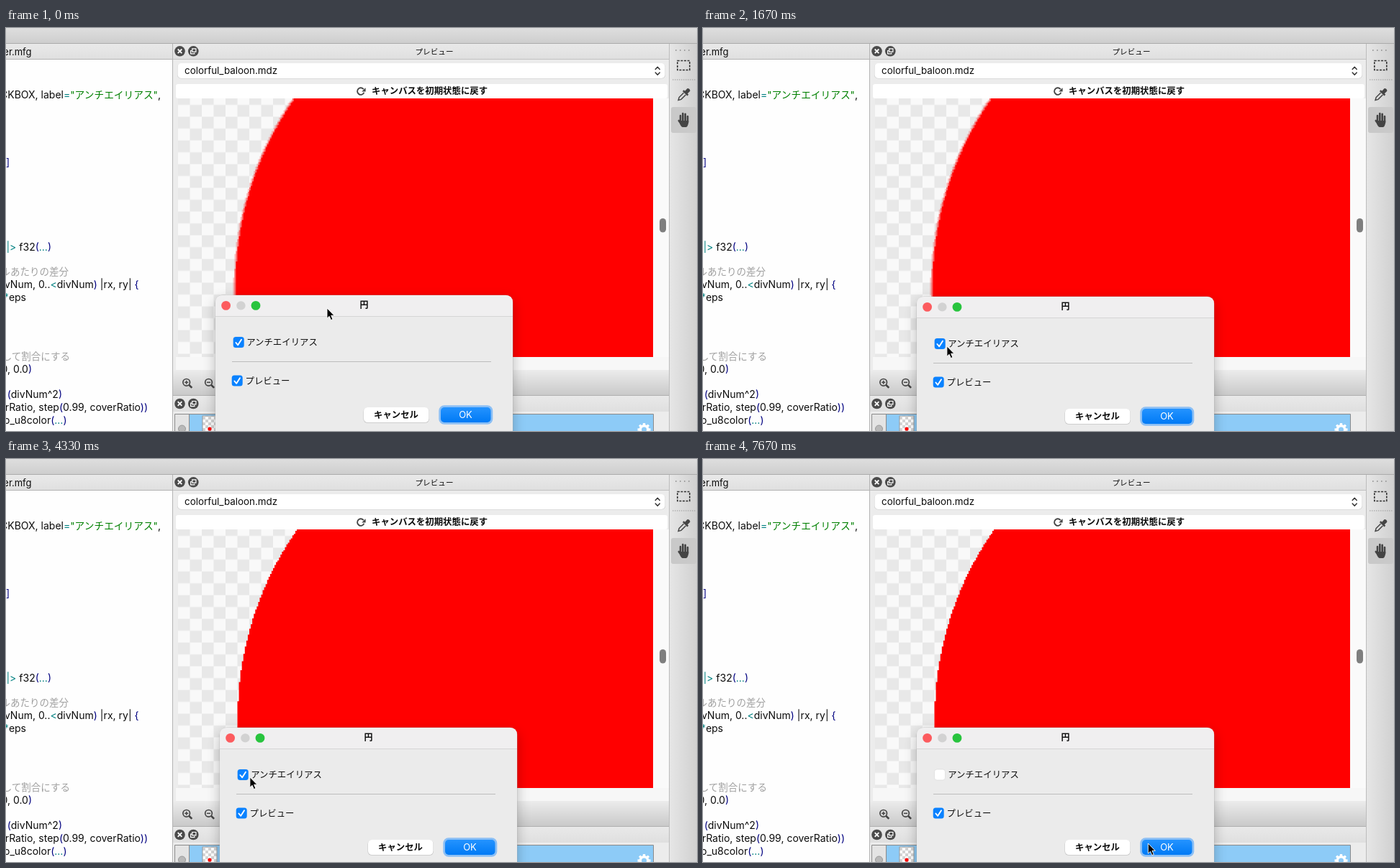
An HTML page for the animation above (8 s loop, 960x561 px).

```html
<!DOCTYPE html>
<html lang="ja">
<head>
<meta charset="utf-8">
<title>プレビュー</title>
<style>
html, body { margin: 0; width: 100%; height: 100%; overflow: hidden; background: #ececec; }
svg { display: block; width: 100vw; height: 100vh; }
text { font-family: Inter, "Noto Sans CJK JP", sans-serif; fill: #0c0c0c; }
.code text { font-size: 14px; text-anchor: end; }
.op { fill: #008080; } .br { fill: #000080; } .str { fill: #008000; font-size: 13.7px; }
.code .note { fill: #a0a0a0; font-size: 13.5px; }
.mid { text-anchor: middle; }
.ui { font-size: 12.4px; }
</style>
</head>
<body>
<svg viewBox="0 0 960 561">
  <defs>
    <linearGradient id="bar" x2="0" y2="1"><stop stop-color="#dedede"/><stop offset="1" stop-color="#cecece"/></linearGradient>
    <linearGradient id="head" x2="0" y2="1"><stop stop-color="#e9e9e9"/><stop offset="1" stop-color="#dfdfdf"/></linearGradient>
    <linearGradient id="foot" x2="0" y2="1"><stop stop-color="#ececec"/><stop offset="1" stop-color="#c9c9c9"/></linearGradient>
    <linearGradient id="side"><stop stop-color="#e6e6e6"/><stop offset="1" stop-color="#d0d0d0"/></linearGradient>
    <linearGradient id="blue" x2="0" y2="1"><stop stop-color="#2493ff"/><stop offset="1" stop-color="#007af5"/></linearGradient>
    <pattern id="checker" x="239" y="123.5" width="33" height="33" patternUnits="userSpaceOnUse">
      <rect width="33" height="33" fill="#f9f9f9"/>
      <path d="M0 0h16.5v33h16.5v-16.5h-33z" fill="#e8e8e8"/>
    </pattern>
    <pattern id="mini" x="273" y="541" width="8" height="8" patternUnits="userSpaceOnUse">
      <rect width="8" height="8" fill="#fff"/><path d="M0 0h4v8h4v-4h-8z" fill="#d4d4d4"/>
    </pattern>
    <filter id="shade" x="-20%" y="-20%" width="140%" height="140%"><feGaussianBlur stdDeviation="9"/></filter>
    <g id="close">
      <circle r="7.3" fill="#4b4b4b"/>
      <path d="M-2.8-2.8l5.6 5.6M2.8-2.8l-5.6 5.6" stroke="#fff" stroke-width="1.8"/>
    </g>
    <g id="float">
      <circle r="7.3" fill="#4b4b4b"/>
      <path d="M-1.6-3.5h5.2v4.4h-5.2zM-2.2-.8h-1.5v4.4h5.2v-1.5" fill="none" stroke="#fff" stroke-width="1.2"/>
    </g>
    <g id="lens" fill="none" stroke="#444">
      <circle r="4.8" stroke-width="1.7"/>
      <path d="M3.6 3.6l4 4" stroke-width="2.6"/>
      <path d="M-2.5 0h5" stroke-width="1.5"/>
    </g>
    <g id="box">
      <rect width="15" height="15" rx="3.5" fill="#0a82ff"/>
      <path d="M3.7 8l2.8 3.3L11.3 3.8" fill="none" stroke="#fff" stroke-width="1.9" stroke-linecap="round" stroke-linejoin="round"/>
    </g>
  </defs>

  <rect width="960" height="561" fill="#ececec"/>
  <rect width="960" height="21" fill="url(#bar)"/>
  <path d="M0 21.5h960" stroke="#ababab"/>

  <!-- code editor -->
  <rect y="22" width="231" height="22" fill="url(#head)"/>
  <rect y="44" width="231" height="517" fill="#fefefe"/>
  <path d="M0 43.5h231M231.5 22v539" stroke="#b4b4b4"/>
  <g class="code">
    <text x="35.5" y="38" style="font-size:13px">er.mfg</text>
    <text x="215" y="97.5">CKBOX, label<tspan class="op">=</tspan><tspan class="str">"アンチエイリアス"</tspan>,</text>
    <text x="5" y="191.5" class="br">]</text>
    <text x="63" y="309.5"><tspan class="op">|&gt;</tspan> f32<tspan class="br">(</tspan><tspan class="op">...</tspan><tspan class="br">)</tspan></text>
    <text x="87" y="344" class="note">ルあたりの差分</text>
    <text x="184.5" y="362">ivNum, 0..<tspan class="op">&lt;</tspan>divNum<tspan class="br">)</tspan> |rx, ry| <tspan class="br">{</tspan></text>
    <text x="28" y="379.5"><tspan class="op">*</tspan>eps</text>
    <text x="89" y="462" class="note">して割合にする</text>
    <text x="36" y="480">0, 0.0<tspan class="br">)</tspan></text>
    <text x="78" y="515"><tspan class="br">(</tspan>divNum^2<tspan class="br">)</tspan></text>
    <text x="197" y="532.5">rRatio, step<tspan class="br">(</tspan>0.99, coverRatio<tspan class="br">))</tspan></text>
    <text x="84.5" y="550.5">o_u8color<tspan class="br">(</tspan><tspan class="op">...</tspan><tspan class="br">)</tspan></text>
  </g>

  <!-- preview panel -->
  <rect x="232" y="22" width="690" height="22" fill="url(#head)"/>
  <path d="M232 43.5h690" stroke="#c2c2c2"/>
  <use href="#close" x="241.5" y="32.3"/><use href="#float" x="260.3" y="32.3"/>
  <text x="595" y="36.8" class="mid" font-size="10.6">プレビュー</text>
  <rect x="238" y="49.5" width="678" height="21" rx="5" fill="#cfcfcf"/>
  <rect x="238.5" y="49" width="677" height="21" rx="5" fill="#fff"/>
  <text x="248" y="64.3" font-size="13.4">colorful_baloon.mdz</text>
  <path d="M902.2 57.5l3-3.3 3 3.3M902.2 62l3 3.3 3-3.3" fill="none" stroke="#333" stroke-width="1.5" stroke-linecap="round" stroke-linejoin="round"/>
  <rect x="236" y="78" width="683" height="20" rx="3" fill="#fff"/>
  <path d="M496.8 85.3a4.8 4.8 0 1 0 .6 4.4" fill="none" stroke="#444" stroke-width="1.9"/>
  <path d="M499.6 83.2v5.2h-5.4z" fill="#444"/>
  <text x="508" y="92.4" class="ui" font-weight="600">キャンバスを初期状態に戻す</text>

  <rect x="239" y="98" width="660" height="360" fill="url(#checker)"/>
  <g id="soft" fill="red"></g>
  <path id="hard" fill="red"/>
  <rect x="899" y="98" width="22" height="360" fill="#fafafa"/>
  <rect x="908" y="265" width="9" height="19.5" rx="4.5" fill="#7f7f7f"/>
  <rect x="236" y="458" width="685" height="18" fill="#f7f7f7"/>
  <rect x="232" y="476" width="690" height="35" fill="url(#foot)"/>
  <path d="M232 511.5h690" stroke="#b0b0b0"/>
  <use href="#lens" x="250.7" y="493.3"/><path d="M250.7 490.8v5" stroke="#444" stroke-width="1.5"/>
  <use href="#lens" x="281.5" y="493.3"/>

  <!-- layer list -->
  <rect x="232" y="512" width="690" height="22" fill="url(#head)"/>
  <use href="#close" x="241.5" y="523"/><use href="#float" x="260.3" y="523"/>
  <rect x="235" y="537" width="665" height="24" fill="#e4e4e4"/>
  <rect x="255" y="538" width="645" height="23" fill="#8dcbf7"/>
  <path d="M234.5 561v-23.5h665v23.5M254.5 538v23" fill="none" stroke="#8a8a8a"/>
  <circle cx="244.5" cy="558" r="5" fill="#b9b9b9" stroke="#999"/>
  <rect x="273" y="540" width="20" height="22" fill="url(#mini)" stroke="#9a9a9a"/>
  <circle cx="283" cy="558" r="2.6" fill="red"/>
  <g id="gear" transform="translate(886.5 559)" stroke="#fff" stroke-width="3.4">
    <circle r="5.2" fill="none"/>
  </g>

  <!-- tools -->
  <rect x="922" y="22" width="38" height="539" fill="url(#side)"/>
  <path d="M921.5 22v539" stroke="#bdbdbd"/>
  <path d="M930 31h21" stroke="#8c8c8c" stroke-width="1.5" stroke-dasharray="1.6 4.4"/>
  <rect x="932.8" y="45.5" width="17" height="13" fill="none" stroke="#333" stroke-width="1.6" stroke-dasharray="3 1.6"/>
  <path d="M926 72h32" stroke="#999" stroke-dasharray="1.5 1.5"/>
  <g transform="translate(941.5 93) rotate(45)" fill="#444">
    <path d="M-2.6-10q2.6-2.4 5.2 0v5h2v2.6h-9.2v-2.6h2z"/>
    <path d="M-2-2v9l2 3.5 2-3.5v-9" fill="none" stroke="#444" stroke-width="1.5"/>
  </g>
  <rect x="924" y="110" width="35" height="36" rx="3" fill="#c9c9c9"/>
  <g fill="none" stroke="#444" stroke-linecap="round">
    <path d="M937 131v-9M940.3 130v-11M943.7 130v-10.3M947 131v-8" stroke-width="2.6"/>
    <path d="M938 133.5l-3.2-4.5" stroke-width="2.7"/>
    <path d="M936 129h12.2v3q-1 5.5-3.4 6h-5q-2-.5-3.8-5z" fill="#444" stroke="none"/>
  </g>

  <!-- dialog, in its own coordinates -->
  <g id="dialog">
    <rect y="6" width="413" height="220" rx="10" opacity=".25" filter="url(#shade)"/>
    <rect x="-.5" y="-.5" width="414" height="220" rx="10.5" fill="#a5a5a5" opacity=".5"/>
    <rect width="413" height="220" rx="10" fill="#ebebeb"/>
    <path d="M0 29.5V10Q0 0 10 0H403Q413 0 413 10V29.5z" fill="#f0eff0"/>
    <path d="M0 29.5h413" stroke="#d6d6d6"/>
    <circle cx="14.6" cy="14.4" r="6.4" fill="#fc5b5e"/>
    <circle cx="35.4" cy="14.4" r="6.2" fill="#d2d2d2"/>
    <circle cx="56" cy="14.4" r="6.4" fill="#28c43e"/>
    <text x="206.5" y="18.4" class="mid" font-size="12" font-weight="600">円</text>
    <rect x="24.5" y="58" width="15" height="15" rx="3.5" fill="#fff" stroke="#d5d5d5" stroke-width=".6"/>
    <use id="tick" href="#box" x="24.7" y="58"/>
    <text x="43.2" y="70" class="ui">アンチエイリアス</text>
    <path d="M23 92.5h360" stroke="#bcbcbc"/>
    <use href="#box" x="22.7" y="111.5"/>
    <text x="41.5" y="123.5" class="ui">プレビュー</text>
    <rect x="205.5" y="156.5" width="91.5" height="21.3" rx="5.5" fill="#c6c6c6"/>
    <rect x="206" y="156" width="90.5" height="21" rx="5.5" fill="#fff"/>
    <text x="251" y="170.5" class="ui mid" font-weight="600">キャンセル</text>
    <rect x="310.3" y="153.3" width="75" height="26.5" rx="7.5" fill="#8bbff5"/>
    <rect x="313" y="156" width="69.5" height="21" rx="5" fill="url(#blue)"/>
    <text x="347.5" y="170.7" class="mid" font-size="13" style="fill:#fff">OK</text>
  </g>
  <path id="pointer" d="M0 0V14.2L3.2 11.3 5.5 16.6 8 15.5 5.7 10.3H10z" fill="#000" stroke="#fff" stroke-width=".9"/>
</svg>
<script>
const $ = id => document.getElementById(id);
const NS = 'http://www.w3.org/2000/svg';
const LOOP = 8000;

function add(parent, tag, attrs) {
  const el = document.createElementNS(NS, tag);
  for (const k in attrs) el.setAttribute(k, attrs[k]);
  parent.append(el);
}

// Zoomed disc: its left edge snapped to the cells of the enlarged canvas
const view = { left: 239, top: 98, right: 899, bottom: 458 };
const cell = 2.0625;

function disc(r) {
  const cx = 779, cy = 360;
  let d = `M${view.right} ${view.top}`;
  for (let y = view.top; y < view.bottom; y += cell) {
    const edge = cx - Math.sqrt(r * r - (y + cell / 2 - cy) ** 2);
    const x = view.left + Math.round((edge - view.left) / cell) * cell;
    d += `H${x.toFixed(2)}V${Math.min(y + cell, view.bottom).toFixed(2)}`;
  }
  return d + `H${view.right}z`;
}

$('hard').setAttribute('d', disc(457));
[[462.8, .22], [461.3, .45], [459.8, 1]].forEach(([r, opacity]) =>
  add($('soft'), 'path', { d: disc(r), opacity }));

for (let a = 0; a < 360; a += 45)
  add($('gear'), 'path', { d: 'M0-5.5V-9', transform: `rotate(${a})` });

// Pointer: time, x, y
const moves = [
  [0, 446, 390], [330, 448.5, 391.5], [670, 452, 402], [1000, 458, 423],
  [1330, 314.5, 438], [1670, 338.9, 443], [2670, 345, 443.5], [3000, 338.9, 443],
  [6670, 340.5, 441], [7330, 560, 512], [7670, 618.3, 535]
];
const within = (t, a, b) => t >= a && t < b;
const show = (id, on) => $(id).setAttribute('visibility', on ? 'visible' : 'hidden');
const place = (id, x, y) => $(id).setAttribute('transform', `translate(${x} ${y})`);

function draw(t) {
  const [, x, y] = moves.findLast(m => m[0] <= t);
  place('pointer', x, y);
  if (t < 330) place('dialog', 291, 372);
  else place('dialog', 297, 374);

  // The canvas catches up a little after each click
  show('tick', !within(t, 2330, 4330) && t < 6670);
  const jagged = within(t, 3000, 5000) || t >= 7670;
  show('hard', jagged);
  show('soft', !jagged);
}

const start = performance.now();
function tick() {
  draw((performance.now() - start) % LOOP);
  requestAnimationFrame(tick);
}
tick();
</script>
</body>
</html>
```
